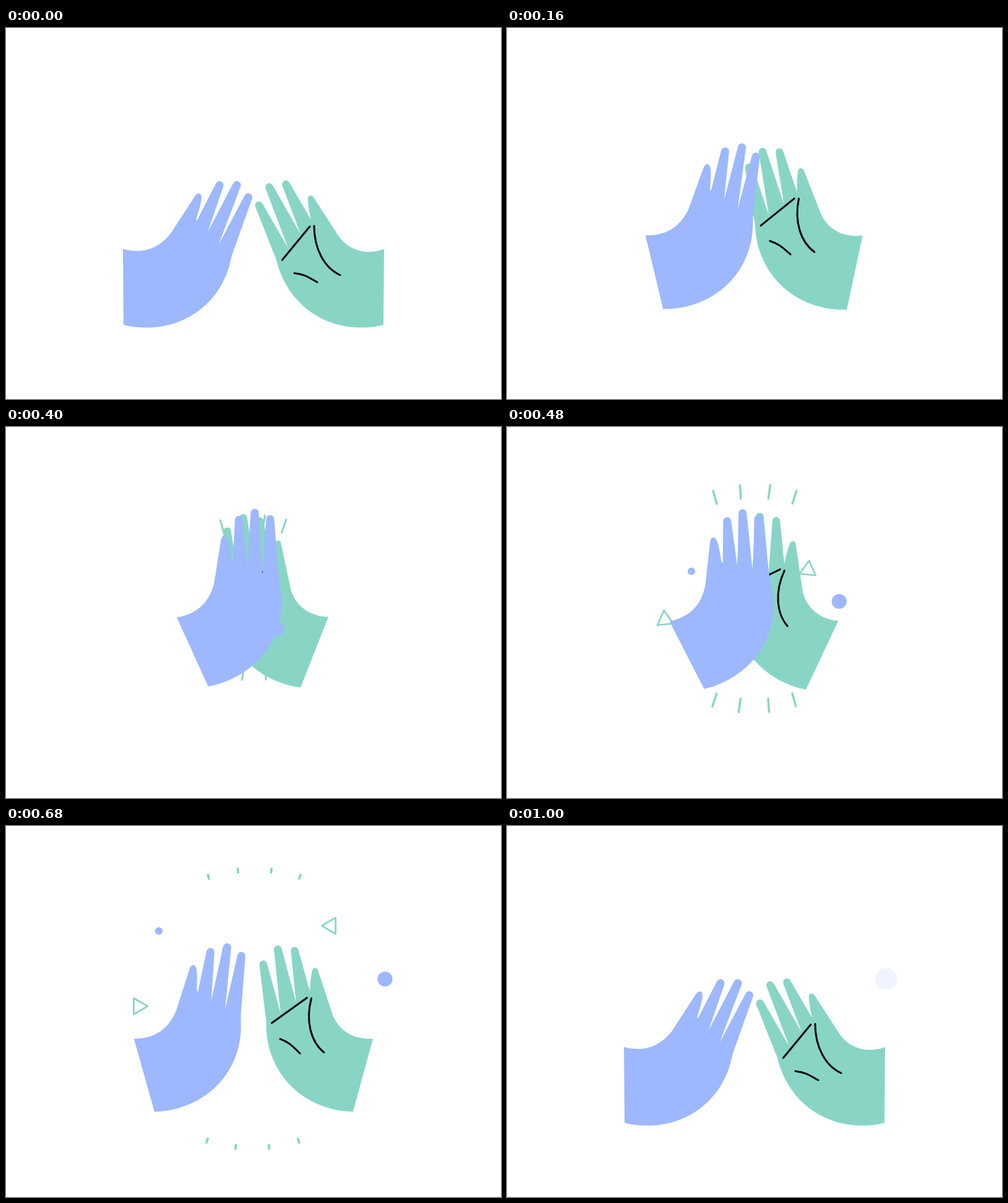
Recreate the animation shown at these times as an HTML page with a canvas. Size 800 by 600 pixels, loop 1400 ms.

```html
<!DOCTYPE html>
<html>
<head>
<meta charset="utf-8">
<title>High five</title>
<style>
html, body { margin: 0; height: 100%; overflow: hidden; background: #fff; }
canvas { display: block; }
</style>
</head>
<body>
<canvas id="stage" width="800" height="600"></canvas>
<script>
const ctx = document.getElementById('stage').getContext('2d');
const BLUE = '#9db8ff', GREEN = '#89d5c5';
const LOOP = 1400, MOVE_END = 1000;
const TIMES = [0, 160, 400, 560, 680, 800];

const left = {
  color: BLUE, side: 1, wrist: [189, 357.5],
  shape: new Path2D(`M189 357.5 C216 364.5 244 361 267 331 L304 274
    C308 268 310 267.5 312 267.5 C316 268 317 274 315 282
    C313 292 309.5 301 307.5 309 Q307.6 311.5 309 310.5
    L339.5 251 A6.5 6.5 0 0 1 351 257 L326 330
    L367 251.5 A6.5 6.5 0 0 1 379 257 L343.5 350.5
    L385.8 270.8 A6.5 6.5 0 0 1 397.7 276 L367 362
    C364 371 363 377 361 384 C345 442 294 484.5 227 484.5
    C214 484.5 201 483 190 480 Z`),
  x: [0, 34.5, 87, 51, 18, 0],
  y: [0, 22, 49.5, 31.5, 13.5, 0],
  turn: [0, 13, 24, 28, 15.3, 0]
};
const right = {
  color: GREEN, side: -1, wrist: [611, 357.5],
  shape: new Path2D(`M611 357.5 C600 361.5 592 362 584 362
    C563 361 546 350 536 334 L497.5 274.5
    C495 271 493.5 270.8 491.5 271 C488.5 271.5 487.5 274 488 279
    C488.5 290 491 300 493 310
    L458 250 A6.2 6.2 0 0 0 446.8 255.5 L476 333
    L431 254.5 A6.2 6.2 0 0 0 419.8 260.3 L456 356
    L414.5 284 A6.2 6.2 0 0 0 403.2 289.5 L433 365
    C436 371 437 375 438 379 C454 440 506 484.5 574 484.5
    C588 484.5 600 483 610 480 Z`),
  creases: new Path2D(`M446.5 375 L491 321
    M498 320 C498 358 515 388 540 399.5
    M466 396.5 C481 398 487 402 503 411`),
  x: [0, 36, 90, 51.5, 18, 0],
  y: [0, 22, 50.5, 32.5, 14, 0],
  turn: [0, 11.5, 20.9, 26.9, 14.9, 0]
};

// Burst strokes: end point and slant (dx per dy)
const rays = [[326.3, 79, .28], [374.7, 69, .07], [429.2, 69, -.145], [476, 79, -.33]];
const raySum = [552, 552, 552, 562, 591, 591];

const clamp = v => Math.max(0, Math.min(1, v));
const ramp = (t, from, to) => clamp((t - from) / (to - from));

// Smooth monotone interpolation through values at TIMES
function track(values, t) {
  const last = TIMES.length - 1;
  if (t >= TIMES[last]) return values[last];
  const i = TIMES.findIndex((time, n) => t < TIMES[n + 1]);
  const rate = n => (values[n + 1] - values[n]) / (TIMES[n + 1] - TIMES[n]);
  const slope = n => {
    if (n === 0 || n === last) return 0;
    const a = rate(n - 1), b = rate(n);
    return a * b > 0 ? 2 * a * b / (a + b) : 0;
  };
  const span = TIMES[i + 1] - TIMES[i], u = (t - TIMES[i]) / span, w = 1 - u;
  return values[i] * (1 + 2 * u) * w * w + values[i + 1] * u * u * (3 - 2 * u)
    + span * u * w * (slope(i) * w - slope(i + 1) * u);
}

function drawHand(hand, t) {
  const [wx, wy] = hand.wrist;
  ctx.save();
  ctx.translate(wx + hand.side * track(hand.x, t), wy - track(hand.y, t));
  ctx.rotate(-hand.side * track(hand.turn, t) * Math.PI / 180);
  ctx.translate(-wx, -wy);
  ctx.fillStyle = hand.color;
  ctx.fill(hand.shape);
  if (hand.creases) {
    ctx.strokeStyle = '#000';
    ctx.lineWidth = 3;
    ctx.stroke(hand.creases);
  }
  ctx.restore();
}

function drawRays(t) {
  const size = 21.7 * (1 - ramp(t, 600, 715));
  if (size <= 0) return;
  const dist = 116 * (1 - ramp(t, 360, 680)) ** 3.2;
  ctx.strokeStyle = GREEN;
  ctx.lineWidth = 3 + ramp(t, 400, 540) * .8;
  ctx.beginPath();
  for (const [x, y, slant] of rays) {
    const len = Math.hypot(slant, 1);
    for (const d of [dist, dist + size]) {
      const px = x + slant * d / len, py = y + d / len;
      d === dist ? ctx.moveTo(px, py) : ctx.lineTo(px, py);
    }
  }
  ctx.stroke();
  ctx.save();
  ctx.translate(800, track(raySum, t));
  ctx.rotate(Math.PI);
  ctx.stroke(rayCopy(dist, size));
  ctx.restore();
}

function rayCopy(dist, size) {
  const path = new Path2D();
  for (const [x, y, slant] of rays) {
    const len = Math.hypot(slant, 1), end = dist + size;
    path.moveTo(x + slant * dist / len, y + dist / len);
    path.lineTo(x + slant * end / len, y + end / len);
  }
  return path;
}

function drawDot(x, y, r, alpha) {
  ctx.globalAlpha = alpha;
  ctx.fillStyle = BLUE;
  ctx.beginPath();
  ctx.arc(x, y, r, 0, 7);
  ctx.fill();
  ctx.globalAlpha = 1;
}

function drawTriangle(x, y, angle, alpha) {
  ctx.globalAlpha = alpha;
  ctx.strokeStyle = GREEN;
  ctx.lineWidth = 2.7;
  ctx.beginPath();
  for (let i = 0; i < 3; i++) {
    const a = angle + i * Math.PI * 2 / 3;
    ctx.lineTo(x + 15 * Math.cos(a), y + 15 * Math.sin(a));
  }
  ctx.closePath();
  ctx.stroke();
  ctx.globalAlpha = 1;
}

function drawConfetti(t) {
  const back = ((1 - ramp(t, 360, 680)) / .875) ** 2.48;
  const spin = (t - 680) * .12 * Math.PI / 180;
  const drop = Math.max(0, t - 680) / 70;
  const fade = 1 - ramp(t, 860, 980);
  drawTriangle(214 + 96 * back, 291.5 + 47 * back + drop, -spin, fade);
  drawTriangle(525.2 - 90 * back, 161.3 + 163 * back + drop, Math.PI + spin, fade);
  drawDot(247 + 119 * back, 169.8 + 148 * back,
    6.1 * (1 + .5 * ramp(t, 700, 960) ** 2), 1 - ramp(t, 840, 960));
  drawDot(612.5 - 176.5 * back, 247.5 + 80.5 * back,
    12.1 * (1 + .47 * ramp(t, 740, 1000) ** 2), 1 - ramp(t, 860, 1026));
}

function draw(now) {
  const t = Math.min(now % LOOP, MOVE_END);
  ctx.clearRect(0, 0, 800, 600);
  ctx.lineCap = 'round';
  ctx.lineJoin = 'round';
  const burst = t >= 380;
  if (burst) drawRays(t);
  drawHand(right, t);
  if (burst) drawConfetti(t);
  drawHand(left, t);
}

const start = performance.now();
function tick() {
  draw(performance.now() - start);
  requestAnimationFrame(tick);
}
tick();
</script>
</body>
</html>
```
